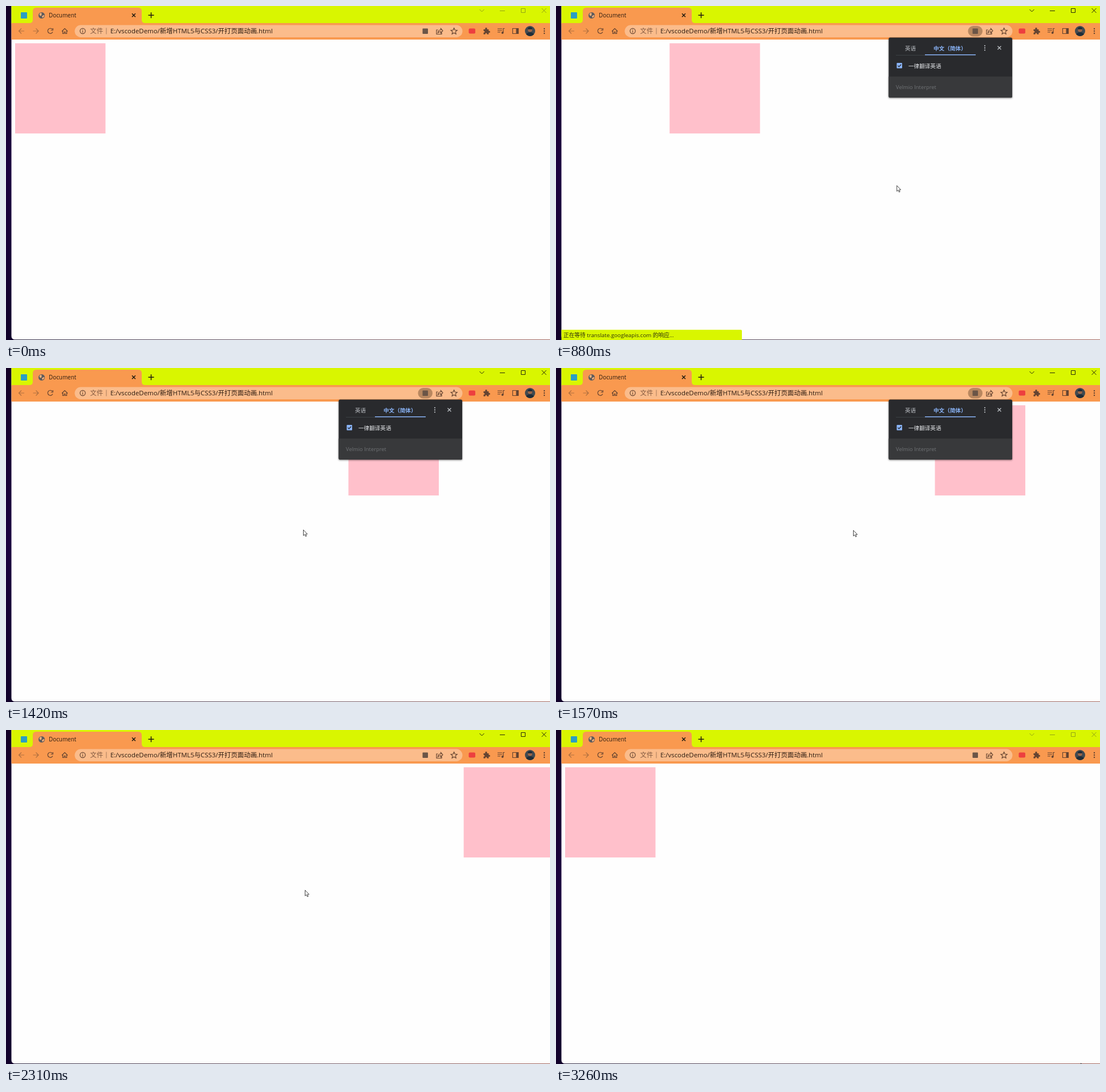
An HTML page for the animation above (3.33 s loop, 954 px wide and 587 px high).

```html
<!DOCTYPE html>
<html lang="zh">
<head>
<meta charset="utf-8">
<title>Document</title>
<style>
  html, body { margin: 0; width: 100%; height: 100%; overflow: hidden; background: #fefefe; }
  svg { display: block; width: 100vw; height: 100vh; font-family: "Open Sans", "Noto Sans CJK SC", sans-serif; }
  .line { fill: none; stroke: #654431; stroke-width: 1.2; }
  .solid { fill: #654431; }
  #popup { transform-box: fill-box; transform-origin: center; filter: drop-shadow(0 1px 1.5px #0008); }
</style>
</head>
<body>
<svg viewBox="0 0 954 587">
  <defs>
    <linearGradient id="edge">
      <stop stop-color="#35304a"/><stop offset=".6" stop-color="#77606c"/><stop offset="1" stop-color="#a4675f"/>
    </linearGradient>
    <linearGradient id="desk" x2="0" y2="1">
      <stop stop-color="#120026"/><stop offset=".5" stop-color="#1b0040"/><stop offset="1" stop-color="#10002a"/>
    </linearGradient>
    <clipPath id="face"><circle cx="919" cy="44" r="9"/></clipPath>
  </defs>

  <!-- desktop and window -->
  <rect width="954" height="587" fill="url(#desk)"/>
  <rect x="14" y="586" width="940" height="1" fill="url(#edge)"/>
  <path d="M9.5 0H954V586H15.5Q9.5 586 9.5 580Z" fill="#fefefe"/>
  <rect x="9.5" width="944.5" height="31" fill="#d9f600"/>
  <path d="M9.5 59V30H41Q47 30 47 24V9Q47 3 53 3H232Q238 3 238 9V24Q238 30 244 30H954V59Z" fill="#f9994f"/>

  <!-- tabs -->
  <rect x="26" y="11" width="11" height="11" rx="1" fill="#2a9fc4"/>
  <circle cx="62.5" cy="16.5" r="5.5" fill="#5c5b5d"/>
  <path d="M58.5 14q4-4 4 0t-3 3zM63 18q5-4 4 0l-3 3z" fill="#f9b27c"/>
  <text x="75" y="20.2" font-size="9.9" fill="#2b1b10">Document</text>
  <path d="M221 13.3l6 6m0-6l-6 6M249.5 16.3h10m-5-5v10" fill="none" stroke="#1f1a10" stroke-width="1.5"/>
  <g id="controls" fill="none" stroke-width="1">
    <path d="M830.5 6l4 4 4-4M866 8.5h9M903.5 4.5h7v7h-7zM939.5 4l8 8m0-8l-8 8"/>
  </g>

  <!-- toolbar -->
  <rect x="120.5" y="33.5" width="680" height="21.5" rx="10.7" fill="#fbbc8b"/>
  <path class="line" opacity=".5" d="M32 44h-9.500m4.500-4.500l-4.500 4.500 4.500 4.500M47.500 44h9.500m-4.500-4.500l4.500 4.500-4.500 4.500"/>
  <path class="line" d="M81.300 41a4.500 4.500 0 1 0 .6 4.500M82.300 39v3.500h-3.500M98 44.500l5-5 5 5M99.500 43.500v5h2.500v-3h2v3h2.500v-5"/>
  <circle class="line" cx="134.500" cy="44" r="4.600"/>
  <path class="line" d="M134.500 43.500v3.200M134.500 41.300v1.200"/>
  <text x="147.500" y="48.300" font-size="11.400" fill="#80583f">文件</text>
  <path d="M176 38.500v11" stroke="#a97b5b"/>
  <text x="183" y="48.300" font-size="11.400" fill="#2b1b10">E:/vscodeDemo/新增HTML5与CSS3/开打页面动画.html</text>
  <rect id="halo" x="722.500" y="35" width="25.500" height="18.500" rx="9.200" fill="#b9875f"/>
  <rect x="730.500" y="39.500" width="9.500" height="9.500" rx="1" fill="#6b5547"/>
  <path class="line" d="M757.500 42h-2.500v7.500h9v-2.500M757.500 47q.5-5 5-5v-2.500l3.500 4-3.500 4v-2.500q-3 0-5 2z"/>
  <path class="line" d="M785.700 38.800l1.600 3.500 3.900.4-2.900 2.600.9 3.900-3.500-2-3.500 2 .9-3.900-2.900-2.600 3.900-.4z"/>
  <rect x="811.500" y="39.500" width="11.500" height="9" rx="2" fill="#ed3f3f"/>
  <path class="solid" d="M837.500 41h3q-.8-3 1.500-3t1.500 3h3v3q2.500-.6 2.500 1.400t-2.500 1.400v3h-3q0-2.200-1.500-2.200t-1.500 2.200h-3v-3q2 0 2-1.500t-2-1.500z"/>
  <path class="line" d="M862 40h8M862 43h8M862 46h5M872 47v-7.500h2.500"/>
  <circle class="solid" cx="870.700" cy="47" r="1.900"/>
  <path class="line" d="M888.500 39.500h10v9h-10z"/>
  <path class="solid" d="M894.500 39h4.500v10h-4.500z"/>
  <g clip-path="url(#face)">
    <rect x="910" y="35" width="18" height="18" fill="#414a50"/>
    <circle cx="919" cy="42" r="3.800" fill="#9a6548"/>
    <path d="M911 54q1-8 8-8t8 8zM915 41q0-4 4-4t4 4z" fill="#202d38"/>
  </g>
  <g class="solid"><circle cx="944" cy="40" r="1.200"/><circle cx="944" cy="44" r="1.200"/><circle cx="944" cy="48" r="1.200"/></g>

  <!-- page -->
  <rect id="box" y="65.500" width="158.500" height="158.500" fill="#ffc0cb"/>
  <g id="status">
    <path d="M9.500 569H324q2 0 2 2V587H9.500z" fill="#d9f600"/>
    <text x="13" y="582" font-size="9.700" fill="#30330c">正在等待 translate.googleapis.com 的响应…</text>
  </g>
  <g id="popup">
    <rect x="583.500" y="55.500" width="216.500" height="105.500" rx="2.500" fill="#292a2d"/>
    <path d="M583.500 124H800v34.500q0 2.500-2.500 2.500H586q-2.500 0-2.500-2.500z" fill="#38393b"/>
    <path d="M596 86.500h51" stroke="#3c4043"/>
    <path d="M647 85.800h89" stroke="#8ab4f8" stroke-width="1.500"/>
    <g font-size="9.600">
      <text x="612" y="77.500" fill="#bdc1c6">英语</text>
      <text x="662" y="77.500" fill="#8ab4f8" font-weight="700">中文（简体）</text>
      <text x="618" y="108.500" fill="#e8eaed">一律翻译英语</text>
      <text x="596" y="146" font-size="9.400" fill="#707376">Velmio Interpret</text>
    </g>
    <rect x="597.500" y="100" width="9.500" height="9.500" rx="1" fill="#8ab4f8"/>
    <path d="M599.500 104.800l2 2 3.800-4" fill="none" stroke="#292a2d" stroke-width="1.300"/>
    <path d="M774.500 70.500l6 6m0-6l-6 6" stroke="#bdc1c6" stroke-width="1.300"/>
    <g fill="#bdc1c6"><circle cx="752" cy="69.800" r="1.100"/><circle cx="752" cy="73.700" r="1.100"/><circle cx="752" cy="77.600" r="1.100"/></g>
  </g>
  <circle id="ring" cx="520.700" cy="283.700" fill="none" stroke="#9fc6f5" stroke-width="2"/>
  <path id="cursor" d="M.5.500v10l2.300-2 1.600 3.500 1.600-.7-1.500-3.400h3z" fill="#fff" stroke="#333" stroke-width=".9"/>
</svg>
<script>
const LOOP = 3330, START = 538, RUN = 2000, TRAVEL = 792.5;
const CURSOR = [
  [70, 905, 590], [560, 690, 372], [670, 661, 347], [1120, 525, 279], [1420, 521, 284],
  [1820, 521, 286], [2310, 524, 281], [2450, 527, 285], [2860, 896, 578],
  [3090, 903, 578], [3260, 920, 585], [LOOP, 922, 588]
];
const $ = id => document.getElementById(id);
const ramp = (t, a, b) => Math.min(1, Math.max(0, (t - a) / (b - a)));
const show = (id, alpha) => $(id).setAttribute("opacity", alpha);

// cubic-bezier(.25, .1, .25, 1)
function ease(p) {
  let lo = 0, hi = 1;
  for (let i = 0; i < 24; i++) {
    const s = (lo + hi) / 2;
    if (.75 * s * (1 - s) + s ** 3 < p) lo = s; else hi = s;
  }
  return .3 * lo * (1 - lo) ** 2 + 3 * (1 - lo) * lo * lo + lo ** 3;
}

function cursorAt(t) {
  const i = Math.max(1, CURSOR.findIndex(k => k[0] > t));
  const [t0, x0, y0] = CURSOR[i - 1], [t1, x1, y1] = CURSOR[i];
  const p = ramp(t, t0, t1);
  return [x0 + (x1 - x0) * p, y0 + (y1 - y0) * p];
}

function draw(t) {
  const p = (t - START) / RUN;
  $("box").setAttribute("x", 16 + (p > 0 && p < 1 ? TRAVEL * ease(p) : 0));

  $("controls").setAttribute("stroke", t >= 280 && t < 3260 ? "#25290c" : "#93a416");
  show("status", t >= 560 && t < 890 ? 1 : 0);

  const open = ramp(t, 625, 715);
  show("popup", open * (1 - ramp(t, 1720, 1800)));
  $("popup").style.transform = `scale(${.945 + .055 * open})`;
  show("halo", ramp(t, 640, 800) * (1 - ramp(t, 1890, 2100)));

  const click = ramp(t, 1700, 1880);
  $("ring").setAttribute("r", 4 + 12 * Math.sqrt(Math.min(1, click * 1.5)));
  show("ring", click > 0 ? Math.min(1, 1.4 * (1 - click)) * .9 : 0);

  show("cursor", t >= 70 ? 1 : 0);
  $("cursor").setAttribute("transform", `translate(${cursorAt(t)})`);
}

function tick() {
  draw(performance.now() % LOOP);
  requestAnimationFrame(tick);
}
tick();
</script>
</body>
</html>
```
